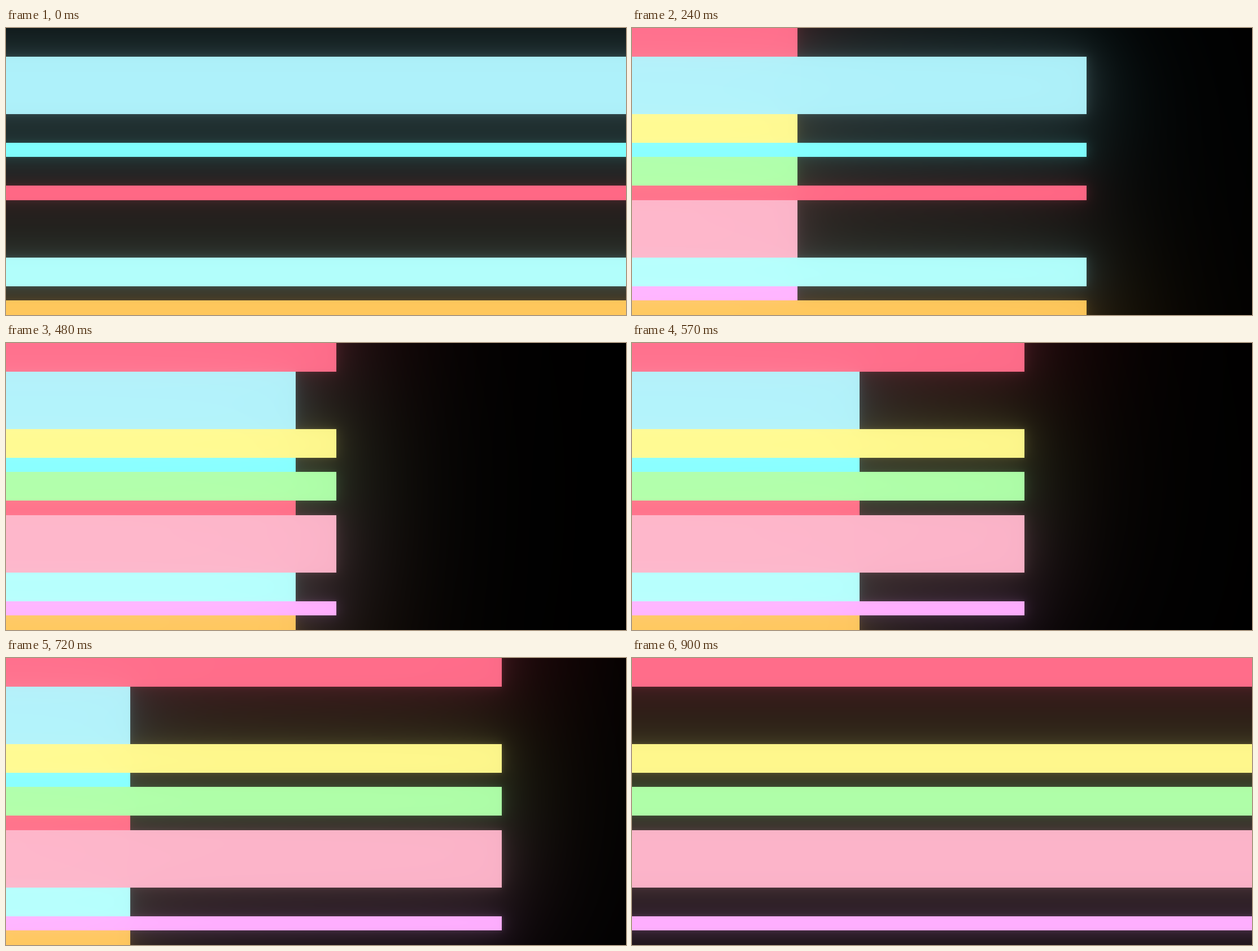
These frames come from a looping animation (1098 by 510 pixels, 1900 ms). An HTML page with a canvas:

```html
<!DOCTYPE html>
<html lang="en">
<head>
<meta charset="utf-8">
<title>Glowing bars</title>
<style>
html, body { margin: 0; width: 100%; height: 100%; overflow: hidden; background: #000; }
canvas { display: block; }
</style>
</head>
<body>
<canvas id="stage" width="1098" height="510"></canvas>
<script type="module">
const W = 1098, H = 510, STEP = 30, STEPS = 30, LOOP = 1900, UNIT = 25.5;
const ctx = document.getElementById('stage').getContext('2d');

// Bars from top to bottom: height in units, colour at full width.
// Even bars grow while odd bars shrink.
const bars = [
  [2, 0xff6d8a], [4, 0xaef1fa], [2, 0xfef78c], [1, 0x80fefe], [2, 0xaffea8],
  [1, 0xff6885], [4, 0xfcb4c9], [2, 0xb2fefb], [1, 0xfeaefe], [1, 0xfec75c]
].map(([units, hex]) => ({
  units,
  shown: [hex >> 16, hex >> 8 & 255, hex & 255].map(toLinear)
}));

// Bloom: a sum of ever wider blurs, added in linear light
const STRENGTH = 0.054;
const sigmas = [2.7, 10, 29, 75, 185];
const weights = [0.68, 0.64, 0.6, 0.56, 0.52].map(w => w * STRENGTH);

function toLinear(v) {
  v /= 255;
  return v <= 0.04045 ? v / 12.92 : ((v + 0.055) / 1.055) ** 2.4;
}

const LEVELS = 16383;
const toByte = Uint8Array.from({ length: LEVELS + 1 }, (_, i) => {
  const v = i / LEVELS;
  const s = v <= 0.0031308 ? v * 12.92 : 1.055 * v ** (1 / 2.4) - 0.055;
  return Math.round(s * 255);
});

// Normal distribution function
const phi = z => 1 / (1 + Math.exp(-z * (1.5976 + 0.07056 * z * z)));

let offset = 0;
bars.forEach((bar, i) => {
  bar.y0 = Math.floor(offset);
  bar.mid = offset + bar.units * UNIT / 2;
  offset += bar.units * UNIT;
  bar.y1 = Math.floor(offset);
  bar.blur0 = i ? bar.y0 : -Infinity;
  bar.blur1 = i < bars.length - 1 ? bar.y1 : Infinity;
  bar.base = bar.shown;
});

// Glow of one set of bars at height y: r, g, b for each blur
function glowAt(y, set) {
  const out = [];
  sigmas.forEach((sigma, k) => {
    const sum = [0, 0, 0];
    for (let i = set; i < bars.length; i += 2) {
      const bar = bars[i];
      const part = weights[k] * (phi((bar.blur1 - y) / sigma) - phi((bar.blur0 - y) / sigma));
      bar.base.forEach((v, c) => sum[c] += part * v);
    }
    out.push(...sum);
  });
  return out;
}

// Find base colours that give the shown colours once the glow is added
for (let pass = 0; pass < 4; pass++) {
  const next = bars.map((bar, i) => {
    const glow = glowAt(bar.mid, i % 2);
    return bar.shown.map((v, c) => {
      for (let j = c; j < glow.length; j += 3) v -= glow[j];
      return Math.max(0, v);
    });
  });
  bars.forEach((bar, i) => bar.base = next[i]);
}

const rows = Array.from({ length: H }, (_, y) => ({
  glow: Float64Array.from([...glowAt(y + 0.5, 0), ...glowAt(y + 0.5, 1)]),
  index: bars.findIndex(bar => y < bar.y1)
}));

function render(step) {
  const grown = W / 2 + Math.trunc(W * step / STEPS - W / 2);
  const edges = [grown, W - grown];

  // Horizontal spread of each blur, for both sets
  const spread = edges.flatMap(edge => {
    const end = edge <= 0 ? -Infinity : edge >= W ? Infinity : edge;
    return sigmas.map(s => Float64Array.from({ length: W }, (_, x) => phi((end - x - 0.5) / s)));
  });

  const img = ctx.createImageData(W, H), px = img.data;
  const line = [0, 1, 2].map(() => new Float64Array(W));
  for (let y = 0, p = 0; y < H; y++) {
    const { glow, index } = rows[y];
    const { base } = bars[index], edge = edges[index % 2];
    for (let c = 0; c < 3; c++) line[c].fill(0).fill(base[c], 0, edge);
    const [red, green, blue] = line;
    for (let j = 0; j < spread.length; j++) {
      const s = spread[j], r = glow[3 * j], g = glow[3 * j + 1], b = glow[3 * j + 2];
      if (r + g + b < 1e-7) continue;
      for (let x = 0; x < W; x++) {
        const v = s[x];
        red[x] += r * v;
        green[x] += g * v;
        blue[x] += b * v;
      }
    }
    for (let x = 0; x < W; x++) {
      px[p++] = toByte[Math.min(LEVELS, red[x] * LEVELS + 0.5 | 0)];
      px[p++] = toByte[Math.min(LEVELS, green[x] * LEVELS + 0.5 | 0)];
      px[p++] = toByte[Math.min(LEVELS, blue[x] * LEVELS + 0.5 | 0)];
      px[p++] = 255;
    }
  }
  return img;
}

const cache = [];
const start = performance.now();
let last = -1;

function tick(now) {
  const t = Math.max(0, now - start) % LOOP;
  const step = Math.min(STEPS, Math.floor(t / STEP + 1e-6));
  if (step !== last) {
    cache[step] ??= render(step);
    ctx.putImageData(cache[step], 0, 0);
    last = step;
  }
  requestAnimationFrame(tick);
}
tick(start);
</script>
</body>
</html>
```
